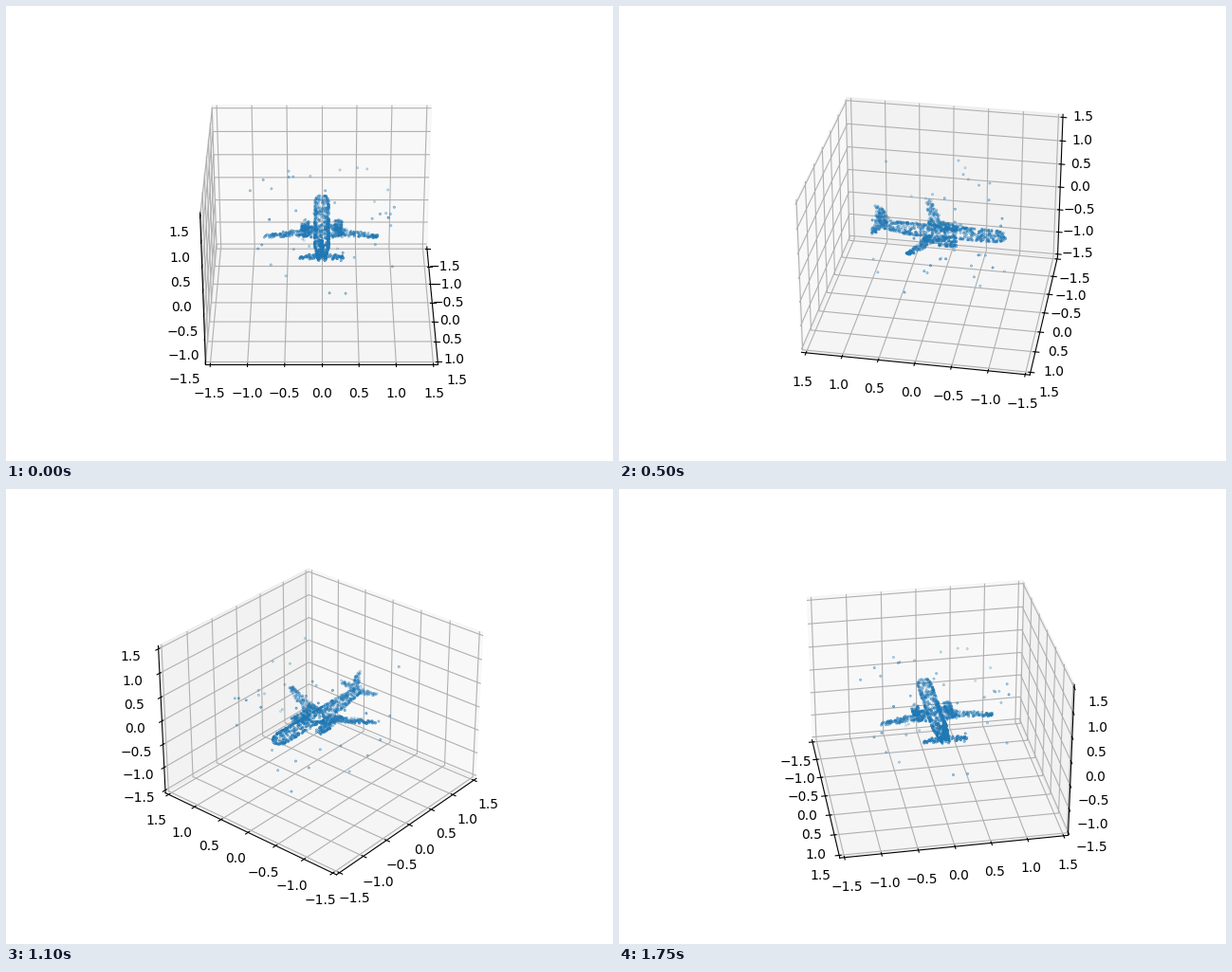
Write a matplotlib script that moves like this. It is 640 px wide and 480 px high and loops after 1800 ms.

```python
import numpy as np
import matplotlib.pyplot as plt
from matplotlib.animation import FuncAnimation

FRAMES = 36
LIMIT = 1.5
rng = np.random.default_rng(7)


def tube(n, x0, x1, y, z, radius):
    """Random points on a cylinder along x; radius and z may depend on x."""
    x = rng.uniform(x0, x1, n)
    a = rng.uniform(0, 2 * np.pi, n)
    r = radius(x)
    return np.c_[x, y + r * np.cos(a), z(x) + r * np.sin(a)]


def panel(n, root, tip, thick=0.01):
    """Random points on a swept panel; root and tip are (front, rear, span, lift)."""
    u = rng.random(n)
    front, rear, span, lift = (a + (b - a) * u for a, b in zip(root, tip))
    x = front + (rear - front) * rng.random(n)
    return np.c_[x, span, lift + rng.uniform(-thick, thick, n)]


def body_radius(x):
    nose = np.sqrt(np.clip(1 - ((-0.82 - x) / 0.18) ** 2, 0, 1))
    tail = 1 - 0.5 * np.clip((x - 0.4) / 0.45, 0, 1)
    return 0.1 * np.where(x < -0.82, nose, tail)


def body_lift(x):
    return 0.06 * np.clip((x - 0.35) / 0.5, 0, 1)


def build_plane():
    parts = [tube(560, -1, 0.85, 0, body_lift, body_radius)]
    for side in (-1, 1):
        kink = (-0.04, 0.14, 0.32 * side, 0)
        parts += [
            panel(115, (-0.3, 0.12, 0.06 * side, -0.05), kink, 0.015),
            panel(75, kink, (0.2, 0.28, 0.8 * side, 0.07)),
            tube(65, -0.34, -0.1, 0.23 * side, lambda x: -0.06,
                 lambda x: 0.05),
            panel(36, (0.68, 0.84, 0.03 * side, 0.07),
                  (0.78, 0.86, 0.3 * side, 0.08)),
        ]
    fin = panel(55, (0.58, 0.82, 0.06, 0), (0.76, 0.84, 0.43, 0))
    parts.append(fin[:, [0, 2, 1]])
    return np.vstack(parts)


fig = plt.figure(figsize=(6.4, 4.8), dpi=100)
ax = fig.add_subplot(projection="3d")
strays = rng.uniform(-1, 1, (46, 3))
points = np.vstack([build_plane(), strays])
ax.scatter(*points.T, s=1, marker=".", linewidths=1.5)
for set_lim in (ax.set_xlim3d, ax.set_ylim3d, ax.set_zlim3d):
    set_lim(-LIMIT, LIMIT, view_margin=1 / 48)


def update(i):
    ax.view_init(elev=30, azim=i * 360 / FRAMES)
    return ()


anim = FuncAnimation(fig, update, frames=FRAMES, init_func=lambda: (),
                     interval=50, repeat=True, repeat_delay=0)
plt.show()
```
